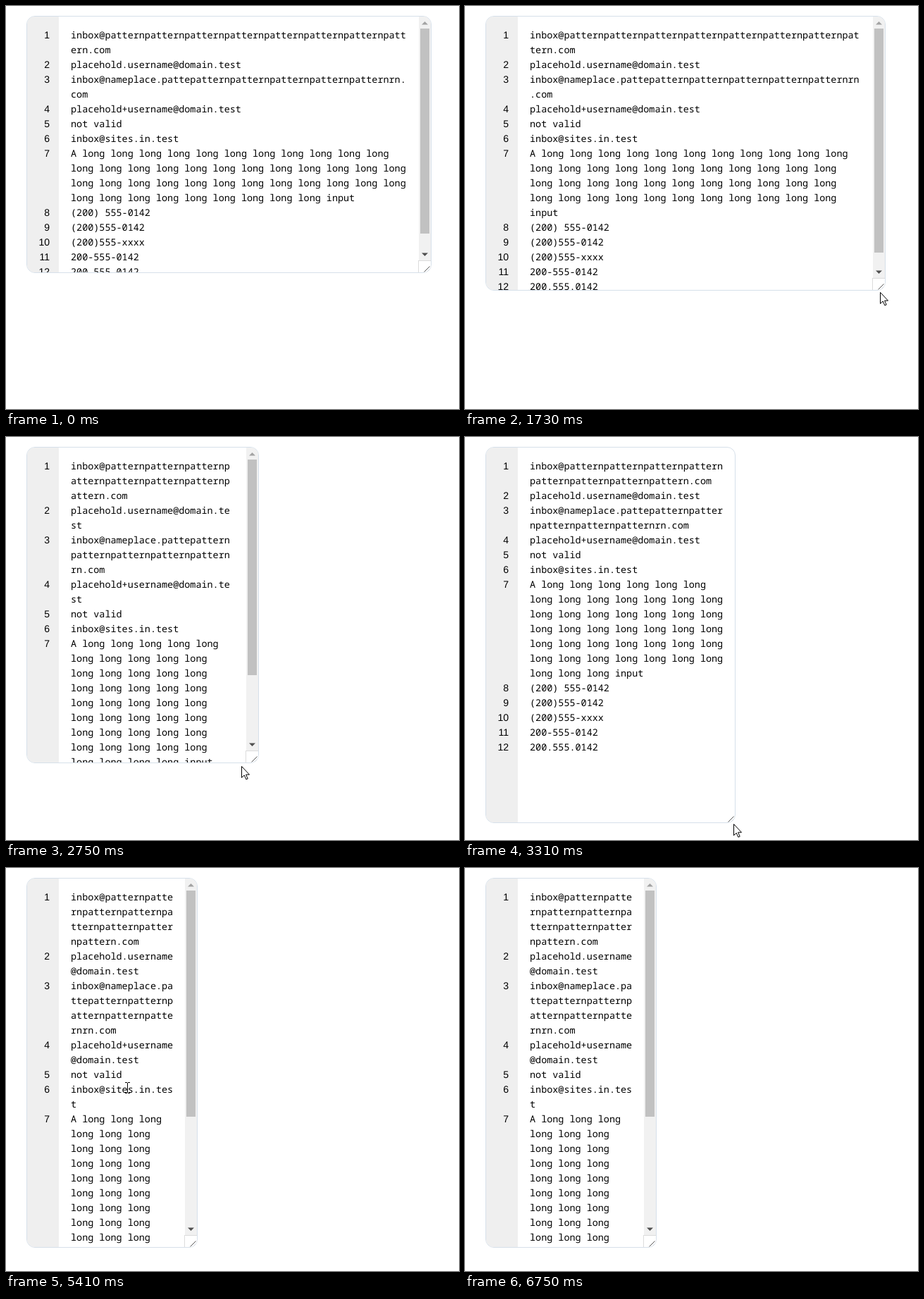
Recreate the animation shown at these times as an HTML page. Size 643 by 572 pixels, loop 7660 ms.

```html
<!DOCTYPE html>
<html lang="en">
<head>
<meta charset="utf-8">
<title>Resizable numbered text area</title>
<style>
  html, body { margin: 0; width: 100%; height: 100%; overflow: hidden; background: #fff; }
  #box {
    position: absolute; left: 29px; top: 14px; box-sizing: border-box; overflow: hidden;
    border: 1px solid #d6e0ea; border-radius: 12px; background: #fff;
  }
  #box > *, #bar > *, #corner svg, #cursor { position: absolute; }
  #gutter { left: 0; top: 0; bottom: 0; width: 45px; background: #efefef; }
  pre { top: 16px; margin: 0; line-height: 21px; color: #000; text-rendering: geometricPrecision; }
  #numbers { left: 0; width: 32px; text-align: right; font: 14px/21px "Liberation Sans", Arial, sans-serif; }
  #text { left: 62px; font: 13.44px/21px "Noto Sans Mono", monospace; font-variant-ligatures: none; }
  #bar { top: 0; right: 0; bottom: 17px; width: 17px; background: #f1f1f1; }
  #thumb { left: 2px; width: 13px; background: #c1c1c1; }
  .arrow { left: 4px; width: 9px; height: 5px; }
  #up { top: 7px; clip-path: polygon(50% 0, 100% 90%, 0 90%); }
  #down { bottom: 6px; clip-path: polygon(0 10%, 100% 10%, 50% 100%); }
  #corner { right: 0; bottom: 0; width: 18px; height: 17px; box-sizing: border-box; }
  #corner.solid { background: #fff; border: solid #dcdcdc; border-width: 1px 0 0 1px; }
  #corner svg { right: 0; bottom: 0; }
  #cursor { left: 0; top: 0; overflow: visible; }
</style>
</head>
<body>
<div id="box">
  <div id="gutter"></div>
  <pre id="numbers"></pre>
  <pre id="text"></pre>
  <div id="bar">
    <div id="up" class="arrow"></div>
    <div id="thumb"></div>
    <div id="down" class="arrow"></div>
  </div>
  <div id="corner">
    <svg width="12" height="12" stroke="#555"><path d="M2.5 11.5l8-8M6.5 11.5l4-4"/></svg>
  </div>
</div>
<svg id="cursor" width="14" height="22">
  <path id="pointer" d="M.5 .5V16.5L4.2 13L6.9 19L9.2 18L6.6 12.2H11.5Z" fill="#fff" stroke="#000"/>
  <path id="beam" d="M-3 -7.5h3M1 -7.5h3M.5 -7V7M-3 7.5h3M1 7.5h3" fill="none" stroke="#000"/>
</svg>
<script>
const LOOP = 7660, ROW = 21, CHAR = 8.064, PAD = 16, BAR = 17;
const LEFT = 29, TOP = 14, TEXT_LEFT = 92;
const SHOW = 70, GRAB = 1270, RELEASE = 4870, HIDE = 6750;

const paragraphs = [
  'inbox@' + 'pattern'.repeat(8) + '.com',
  'placehold.username@domain.test',
  'inbox@nameplace.patte' + 'pattern'.repeat(5) + 'rn.com',
  'placehold+username@domain.test',
  'not valid',
  'inbox@sites.in.test',
  'A ' + 'long '.repeat(44) + 'input',
  '(200) 555-0142',
  '(200)555-0142',
  '(200)555-xxxx',
  '200-555-0142',
  '200.555.0142'
];

// start, end, steps, pointer x, pointer y, scroll, ease-out power
const moves = [
  [70, 250, 4, 610, 396, 0, 1],
  [400, 640, 4, 599, 375, 0, 2],
  [940, 940, 1, 598, 375, 0, 1],
  [1270, 1270, 1, 598, 375, 0, 1],
  [1350, 1970, 9, 582, 430, 0, 1],
  [2060, 2130, 2, 582, 451, 0, 1],
  [2210, 2210, 1, 582, 451, 0, 1],
  [2290, 2670, 6, 353, 458, 0, 1],
  [2750, 2750, 1, 334, 467, 0, 1],
  [2830, 3530, 10, 386, 557, 0, 2],
  [3930, 4010, 2, 320, 552, 0, 1],
  [4090, 4090, 1, 316, 552, 0, 1],
  [4150, 4230, 2, 304, 550, 0, 1],
  [4470, 4630, 3, 265, 535, 0, 2],
  [4790, 4790, 1, 266, 534, 0, 1],
  [4870, 4870, 1, 266, 531, 0, 1],
  [5010, 5410, 6, 172, 312, 0, 2],
  [5650, 5890, 4, 172, 312, 200, 1.5],
  [6030, 6190, 3, 172, 312, 244, 1.5],
  [6350, 6510, 3, 172, 312, 0, 1],
  [6590, 6670, 2, 432, 528, 0, 1],
  [HIDE, HIDE, 1, 432, 528, 0, 1]
];

const mix = (a, b, k) => Math.round(a + (b - a) * k);

function buildSteps() {
  let from = { t: 0, x: 605, y: 570, scroll: 0 };
  const steps = [from];
  for (const [start, end, count, x, y, scroll, power] of moves) {
    for (let i = 1; i <= count; i++) {
      const k = 1 - (1 - i / count) ** power;
      steps.push({
        t: start + (end - start) * (i - 1) / Math.max(1, count - 1),
        x: mix(from.x, x, k), y: mix(from.y, y, k), scroll: mix(from.scroll, scroll, k)
      });
    }
    from = steps[steps.length - 1];
  }
  return steps;
}

function wrap(text, columns) {
  const rows = [];
  let row = '';
  for (let word of text.split(' ')) {
    const joined = row ? row + ' ' + word : word;
    if (joined.length <= columns) { row = joined; continue; }
    if (row) rows.push(row);
    for (; word.length > columns; word = word.slice(columns)) rows.push(word.slice(0, columns));
    row = word;
  }
  return [...rows, row];
}

function layout(width) {
  const columns = Math.floor(width / CHAR);
  const blocks = paragraphs.map(p => wrap(p, columns));
  const rows = blocks.flat();
  return {
    text: rows.join('\n'),
    numbers: blocks.map((b, i) => i + 1 + '\n'.repeat(b.length)).join(''),
    height: rows.length * ROW + 2 * PAD
  };
}

const steps = buildSteps();
const el = id => document.getElementById(id);
const [box, text, numbers, bar, thumb, up, down, corner, cursor, pointer, beam] =
  ['box', 'text', 'numbers', 'bar', 'thumb', 'up', 'down', 'corner', 'cursor', 'pointer', 'beam'].map(el);

// While dragged, the corner trails the pointer by one step.
function cornerAt(index) {
  const { t } = steps[index];
  if (t < GRAB) return [604, 379];
  if (t > RELEASE) return [272, 539];
  const { x, y } = steps[index - 1];
  return [x + 6, y + 5];
}

function drawBox(right, bottom, scroll) {
  const view = bottom - TOP - 2;
  const width = right - 1 - PAD - TEXT_LEFT;
  let content = layout(width);
  const scrolls = content.height > view;
  if (scrolls) content = layout(width - BAR);

  box.style.width = right - LEFT + 'px';
  box.style.height = bottom - TOP + 'px';
  text.textContent = content.text;
  numbers.textContent = content.numbers;
  text.style.transform = numbers.style.transform = `translateY(${-scroll}px)`;
  bar.hidden = !scrolls;
  corner.classList.toggle('solid', scrolls);

  const track = view - 3 * BAR;
  thumb.style.top = BAR + Math.round(track * scroll / content.height) + 'px';
  thumb.style.height = Math.floor(track * view / content.height) + 'px';
  const shade = active => active ? '#505050' : '#a3a3a3';
  up.style.background = shade(scroll > 0);
  down.style.background = shade(scroll < content.height - view);
}

function drawCursor({ t, x, y }, right, bottom) {
  const overText = t > RELEASE && x < right - BAR - 1 && y < bottom;
  cursor.style.display = t >= SHOW && t < HIDE ? '' : 'none';
  cursor.style.transform = `translate(${x}px, ${y}px)`;
  pointer.style.display = overText ? 'none' : '';
  beam.style.display = overText ? '' : 'none';
}

let shown = -1;
function frame() {
  const t = performance.now() % LOOP;
  const index = steps.findLastIndex(s => s.t <= t);
  if (index !== shown) {
    shown = index;
    const [right, bottom] = cornerAt(index);
    drawBox(right, bottom, steps[index].scroll);
    drawCursor(steps[index], right, bottom);
  }
  requestAnimationFrame(frame);
}
frame();
</script>
</body>
</html>
```
